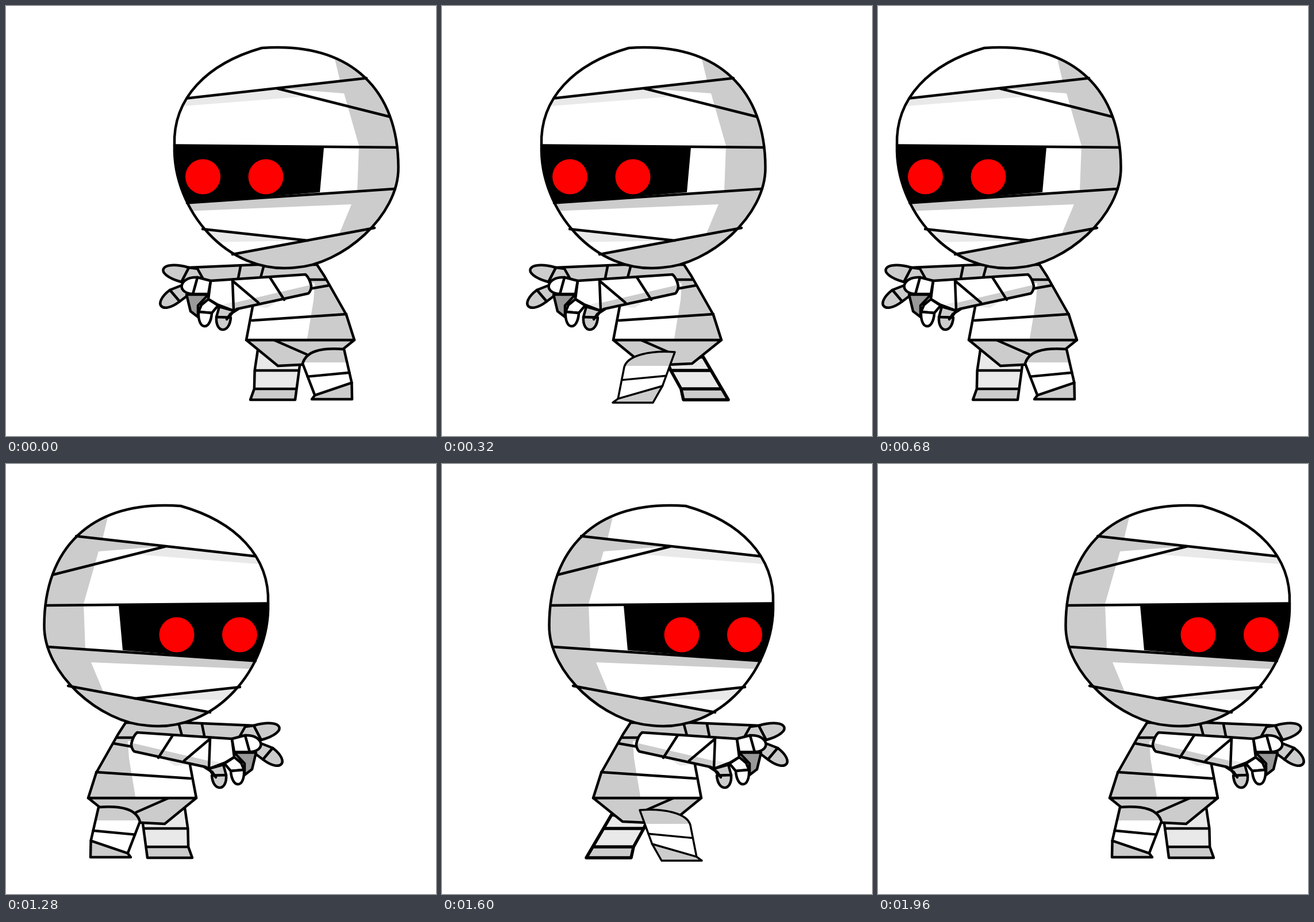
An HTML page with a canvas for the animation above (2.6 s loop, 748 by 748 pixels).

```html
<!DOCTYPE html>
<html lang="en">
<head>
<meta charset="utf-8">
<title>Walking mummy</title>
<style>
html, body { margin: 0; width: 100%; height: 100%; overflow: hidden; background: #fff; }
canvas { display: block; }
</style>
</head>
<body>
<canvas id="stage" width="748" height="748"></canvas>
<script>
const ctx = document.getElementById('stage').getContext('2d');
const LOOP = 2600, TURN = 1280, TICK = 80, MIRROR = 749, LINE = 4.5;
const WHITE = '#fff', LIGHT = '#e9e9e9', GREY = '#ccc', DARK = '#999', BLACK = '#000', RED = '#f00';

// Each leg hangs from two hip points (back, front) and ends in a heel; the rest follows from these.
const STAND = { near: [[516, 622], [588, 597], [532, 684]], far: [[438, 598], [512, 618], [425, 685]], weight: 0 };
const REACH = { near: [[437, 628], [525, 602], [417, 690]], far: [[512, 620], [574, 610], [540, 685]], weight: 1 };
const LIFT = { near: [[468, 625], [547, 600], [469, 688]], far: [[500, 608], [573, 607], [502, 665]], weight: 0.5 };

const HEAD = new Path2D('M445 73C605 62 682 150 682.5 280C684 365 585 450 503 455' +
  'C385 468 290 355 293 243C290 160 350 100 445 73Z');
const TORSO = new Path2D('M449 450H541L554 470L592 537L606 581H418L429 523L443 472Z');
const NEAR_ARM = new Path2D('M356 478L521 467Q528 473 531 487Q531 495 526 500L402 527L396 530L367 519L352 510Z');

const lerp = (a, b, k) => a + (b - a) * k;
const along = (a, b, k) => [lerp(a[0], b[0], k), lerp(a[1], b[1], k)];
const atHeight = (a, b, y) => along(a, b, (y - a[1]) / (b[1] - a[1]));
const shift = ([x, y], dx, dy = 0) => [x + dx, y + dy];
const poly = points => 'M' + points.join('L') + 'Z';

function paint(shape, fill, width = LINE) {
  const path = typeof shape === 'string' ? new Path2D(shape) : shape;
  if (fill) {
    ctx.fillStyle = fill;
    ctx.fill(path);
  }
  if (width) {
    ctx.lineWidth = width;
    ctx.stroke(path);
  }
}

const shade = (shape, fill) => paint(shape, fill, 0);
const lines = (shape, width) => paint(shape, null, width);

function clipped(path, draw) {
  ctx.save();
  ctx.clip(path);
  draw();
  ctx.restore();
}

function blend(a, b, k) {
  const leg = name => a[name].map((p, i) => along(p, b[name][i], k));
  return { near: leg('near'), far: leg('far'), weight: lerp(a.weight, b.weight, k) };
}

// rounded end that grows out of the joint a-b and reaches the tip
function fingertip(a, b, tip, fill) {
  const [mx, my] = along(a, b, 0.5);
  const dx = (tip[0] - mx) * 4 / 3, dy = (tip[1] - my) * 4 / 3;
  paint(`M${a}C${shift(a, dx, dy)} ${shift(b, dx, dy)} ${b}Z`, fill);
}

function drawFarLeg([back, front, heel], width) {
  const toe = shift(heel, 78);
  const rung = up => [atHeight(back, heel, heel[1] - up), atHeight(front, toe, heel[1] - up)];
  const [kneeBack, kneeFront] = rung(51);
  const [cuffBack, cuffFront] = rung(19);
  const ankle = shift(cuffBack, 4);
  const leg = poly([back, kneeBack, ankle, heel, toe, cuffFront, kneeFront, front]);
  shade(leg, LIGHT);
  shade(poly([ankle, heel, toe, cuffFront]), GREY);
  lines(leg + `M${kneeBack}L${kneeFront}M${ankle}L${cuffFront}`, width);
}

function drawHip() {
  paint('M418 581L473 626L512 624L555 622L606 581Z', GREY);
  lines('M466 581L523 606');
}

function drawNearLeg([back, front, heel], width) {
  const toe = shift(heel, 70);
  const shin = shift(along(front, toe, 0.67), 4);
  const ankle = shift(along(back, heel, 0.89), 7);
  const leg = new Path2D(`M${back}C${shift(back, 6, -21)} ${shift(front, -42, -3)} ${front}L${shin}L${toe}L${heel}L${ankle}Z`);
  shade(leg, WHITE);
  clipped(leg, () => {
    ctx.fillStyle = GREY;
    ctx.fillRect(0, 0, 748, back[1] - 2);
  });
  shade(poly([ankle, shin, toe, heel]), GREY);
  lines(leg, width);
  lines(`M${along(back, ankle, 0.41)}L${along(front, shin, 0.7)}M${ankle}L${shin}`, width);
}

function drawTorso() {
  shade(TORSO, WHITE);
  clipped(TORSO, () => {
    shade('M430 440H620V590H522L535 512L537 482L430 480Z', GREY);
    shade('M425 522L475 512L455 525Z', LIGHT);
  });
  lines(TORSO);
  lines('M428 547L592 536M525 476H556M528 492L562 486');
}

function drawFarArm() {
  paint('M318 455L435 450H520V480H335Z', GREY);
  paint('M318 455L305 480L330 473H342L333 457Z', GREY);
  lines('M408 453L404 473');
  fingertip([318, 455], [305, 480], [274, 457], GREY);
  paint('M285 494L308 485L318 502L302 514Z', GREY);
  fingertip([285, 494], [302, 514], [270, 522], GREY);
  paint('M314 502H352L334 521V541L321 531Z', DARK);
}

function drawNearArm() {
  shade(NEAR_ARM, WHITE);
  clipped(NEAR_ARM, () => {
    shade('M398 516L535 484V510L396 532Z', GREY);
    shade('M366 522L398 514V532Z', LIGHT);
  });
  lines(NEAR_ARM);
  lines('M394 478L396 529M394 478L439 516M459 472L484 511');
  paint('M333 472L356 478L352 501H325Z', WHITE);
  fingertip([333, 472], [325, 501], [306, 485], WHITE);
  paint('M371 523L366 541L388 542L396 530Z', GREY);
  fingertip([366, 541], [391, 542], [377, 563], GREY);
  paint('M352 510L369 521L358 534L335 532L340 520Z', WHITE);
  fingertip([335, 532], [358, 534], [345, 557], WHITE);
  lines('M404 527L390 536L384 545');
}

function drawHead() {
  shade(HEAD, WHITE);
  clipped(HEAD, () => {
    shade('M571 88L588 152L614 243L611 322L700 317V80Z', GREY);
    shade('M472 143L627 125L690 125V198Z', WHITE);
    shade('M571 88L581 130L472 143L588 152L594 173L690 198V80Z', GREY);
    shade('M310 161L472 143L525 157L310 174Z', LIGHT);
    shade('M310 343L690 317V386H641L579 398L601 345L310 357Z', GREY);
    shade('M394 432L641 386H690V470H394Z', GREY);
    shade('M342 388L525 408L350 411Z', LIGHT);
    shade('M285 242L553 246L546 324L285 345Z', BLACK);
  });
  lines('M315 160.5L627 125.5M472 143.5L667 192.5M293 242.5L679 246M315 342.5L677 318M342 388L525 408M394 432L641 386');
  lines(HEAD);
  ctx.fillStyle = RED;
  for (const x of [342.5, 452]) {
    ctx.beginPath();
    ctx.arc(x, 297, 30.5, 0, Math.PI * 2);
    ctx.fill();
  }
}

// steps taken in a three-step stride that begins at the given time
function stride(time, start) {
  return Math.max(0, Math.min(3, Math.floor((time - start) / TICK) + 1));
}

function render(time) {
  const t = time % LOOP;
  const back = t >= TURN;
  const phase = back ? t - TURN : t;
  const first = stride(phase, 160), second = stride(phase, 520);
  const walked = 40 * first + 44 * second + (second ? 8 : 0);
  const pose = second ? blend(LIFT, STAND, (second - 1) / 2) : blend(STAND, REACH, first / 3);
  const [hipBack, hipFront, heel] = pose.near;
  const dip = 4 * Math.sin(Math.PI * first / 3);

  ctx.setTransform(1, 0, 0, 1, 0, 0);
  ctx.fillStyle = WHITE;
  ctx.fillRect(0, 0, 748, 748);
  if (back) ctx.setTransform(-1, 0, 0, 1, MIRROR + walked, 0);
  else ctx.setTransform(1, 0, 0, 1, -walked, 0);
  ctx.lineJoin = ctx.lineCap = 'round';
  ctx.strokeStyle = BLACK;

  drawFarLeg(pose.far, LINE + pose.weight);
  drawHip();
  drawNearLeg([hipBack, hipFront, shift(heel, 0, dip)], LINE - pose.weight);
  drawFarArm();
  drawTorso();
  drawNearArm();
  drawHead();
}

const start = performance.now();
function tick() {
  render(performance.now() - start);
  requestAnimationFrame(tick);
}
tick();
</script>
</body>
</html>
```
